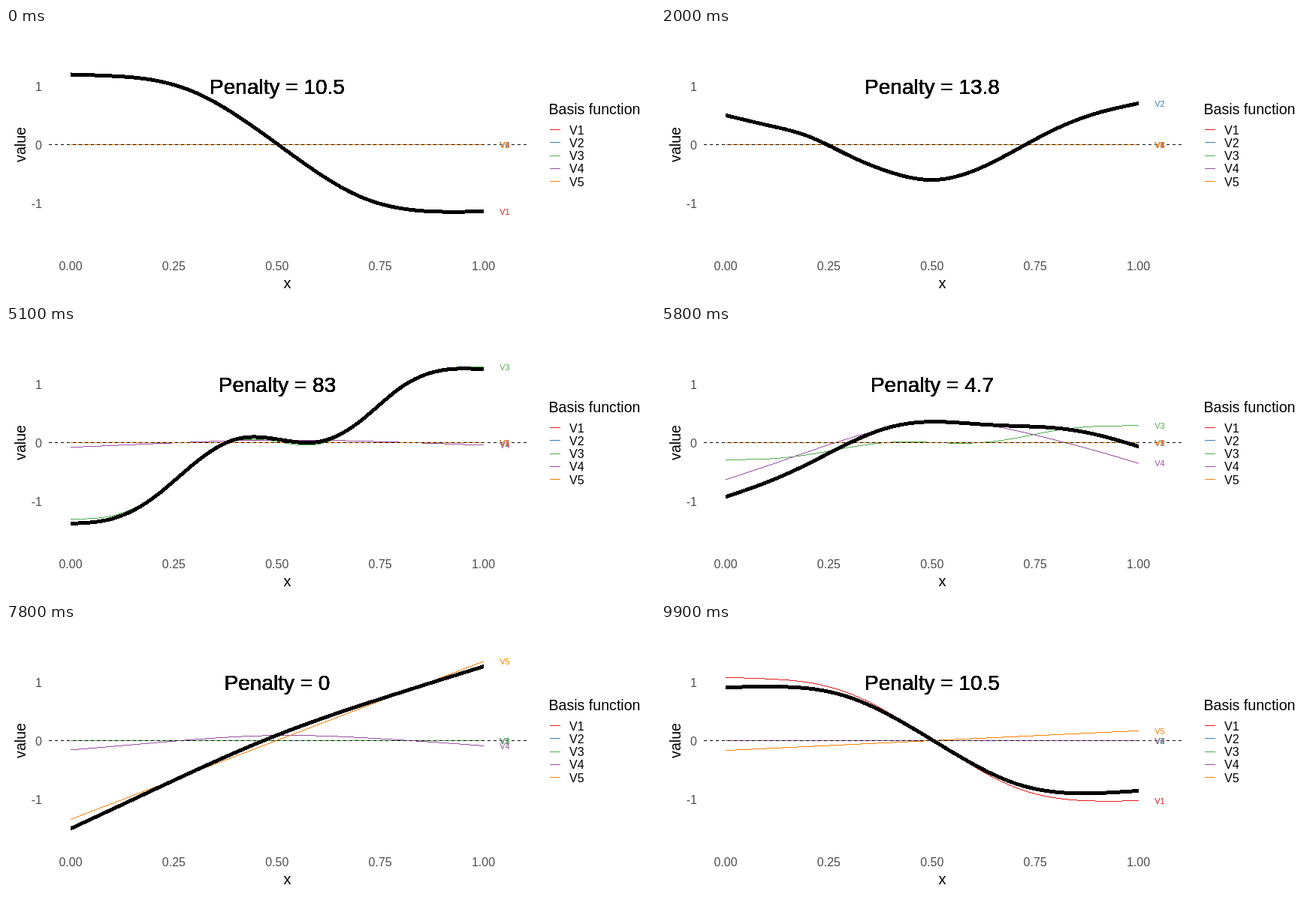
These frames come from a looping animation (864x360 px, 10 s). An HTML page with a canvas:

```html
<!DOCTYPE html>
<html lang="en">
<head>
<meta charset="utf-8">
<title>Basis functions and penalty</title>
<style>
  html, body { margin: 0; width: 100%; height: 100%; overflow: hidden; background: #fff; }
  canvas { display: block; width: 864px; height: 360px; }
</style>
</head>
<body>
<canvas id="stage" width="864" height="360"></canvas>
<script>
const ctx = document.getElementById('stage').getContext('2d');
const FONT = '"Liberation Sans", Arial, sans-serif';
const LEFT = 86, WIDTH = 549.5, COLUMNS = 550, ZERO = 155.5, UNIT = 78.2;
const STEP_MS = 100, STEPS_PER_STATE = 20, HOLD_STEPS = 10;

// Heights in pixels above zero, at evenly spaced x from 0 to 1
const bases = [
  { color: '#E41A1C', penalty: '10.5',
    knots: [93.5, 91.5, 86, 69.8, 39.5, 1, -38, -69, -85, -89.5, -89] },
  { color: '#377EB8', penalty: '13.8',
    knots: [39, 26, 11, -15, -37, -47, -35, -8, 21, 42, 55] },
  { color: '#4DAF4A', penalty: '83',
    knots: [-113, -108.4, -80, -31.4, 2.2, 1.2, -2.4, 28.9, 81.2, 108.8, 112.5] },
  { color: '#984EA3', penalty: '4.7',
    knots: [-61.8, -38.8, -15, 7.5, 25.5, 34.5, 32, 20.5, 4, -14.2, -34.5] },
  { color: '#FF7F00', penalty: '0', knots: [-131, 132] }
];

// Natural cubic spline through the knots
function spline(knots) {
  const last = knots.length - 1;
  const bend = knots.map(() => 0), ratio = bend.slice();
  for (let i = 1; i < last; i++) {
    const pivot = 4 - ratio[i - 1];
    ratio[i] = 1 / pivot;
    bend[i] = (6 * (knots[i - 1] - 2 * knots[i] + knots[i + 1]) - bend[i - 1]) / pivot;
  }
  for (let i = last - 1; i > 0; i--) bend[i] -= ratio[i] * bend[i + 1];
  return x => {
    const i = Math.min(last - 1, Math.floor(x * last));
    const u = x * last - i, v = 1 - u;
    return v * knots[i] + u * knots[i + 1] +
      ((v ** 3 - v) * bend[i] + (u ** 3 - u) * bend[i + 1]) / 6;
  };
}

for (const basis of bases) {
  const height = spline(basis.knots);
  basis.heights = Array.from({ length: COLUMNS }, (_, i) => height(i / (COLUMNS - 1)));
}

function text(str, x, y, size, color = '#000', align = 'left') {
  ctx.font = `${size}px ${FONT}`;
  ctx.fillStyle = color;
  ctx.textAlign = align;
  ctx.fillText(str, x, y);
}

function drawAxes() {
  for (const v of [-1, 0, 1]) {
    text(String(v), 48, Math.round(ZERO - v * UNIT + 6.4), 16, '#4D4D4D', 'right');
  }
  for (let i = 0; i <= 4; i++) {
    text((i / 4).toFixed(2), LEFT + i / 4 * WIDTH, 323, 16, '#4D4D4D', 'center');
  }
  text('x', 374.5, 347, 20, '#000', 'center');
  ctx.save();
  ctx.translate(26, 155.5);
  ctx.rotate(-Math.PI / 2);
  text('value', 0, 0, 19.6, '#000', 'center');
  ctx.restore();
}

function drawLegend() {
  text('Basis function', 722.5, 115, 19.6);
  bases.forEach((basis, i) => {
    const y = 135 + i * 17.28;
    ctx.fillStyle = basis.color;
    ctx.fillRect(724, Math.round(y), 14, 1);
    text('V' + (i + 1), 750, Math.round(y + 6.5), 16);
  });
}

function drawZeroLine() {
  ctx.fillStyle = '#000';
  for (let x = 57; x < 693; x += 8) ctx.fillRect(x, 155, 4, 1);
}

function drawThin(basis, weight) {
  ctx.fillStyle = basis.color;
  basis.heights.forEach((h, i) => {
    ctx.fillRect(LEFT + i, Math.floor(ZERO - weight * h), 1, 1);
  });
}

// Hard-edged thick line, built from whole-pixel columns
function drawSum(weights) {
  const sums = bases[0].heights.map((_, i) =>
    bases.reduce((sum, b, k) => sum + weights[k] * b.heights[i], 0));
  ctx.fillStyle = '#000';
  sums.forEach((h, i) => {
    const slope = i ? h - sums[i - 1] : sums[1] - h;
    const half = 2.5 * Math.hypot(1, slope);
    const top = Math.round(ZERO - h - half);
    ctx.fillRect(LEFT + i, top, 1, Math.round(ZERO - h + half) - top);
  });
}

function draw(step) {
  const state = Math.floor(step / STEPS_PER_STATE);
  const next = (state + 1) % bases.length;
  const mix = Math.max(0, step % STEPS_PER_STATE - HOLD_STEPS) / 10;
  const weights = bases.map((_, i) => i === state ? 1 - mix : i === next ? mix : 0);

  ctx.fillStyle = '#fff';
  ctx.fillRect(0, 0, 864, 360);
  drawAxes();
  drawLegend();
  bases.forEach((basis, i) => drawThin(basis, weights[i]));
  drawZeroLine();
  drawSum(weights);
  bases.forEach((basis, i) => {
    const end = ZERO - weights[i] * basis.heights[COLUMNS - 1];
    text('V' + (i + 1), 664, Math.round(end + 4.3), 11, basis.color, 'center');
  });
  // Repeated drawing hardens the edges of the title
  const { penalty } = bases[mix >= 0.5 ? next : state];
  for (let i = 0; i < 6; i++) {
    text('Penalty = ' + penalty, 361, 88, 28, '#000', 'center');
  }
}

const loopSteps = bases.length * STEPS_PER_STATE;
const start = performance.now();
let shown = -1;
function frame() {
  const step = Math.floor((performance.now() - start) / STEP_MS) % loopSteps;
  if (step !== shown) draw(shown = step);
  requestAnimationFrame(frame);
}
frame();
</script>
</body>
</html>
```
